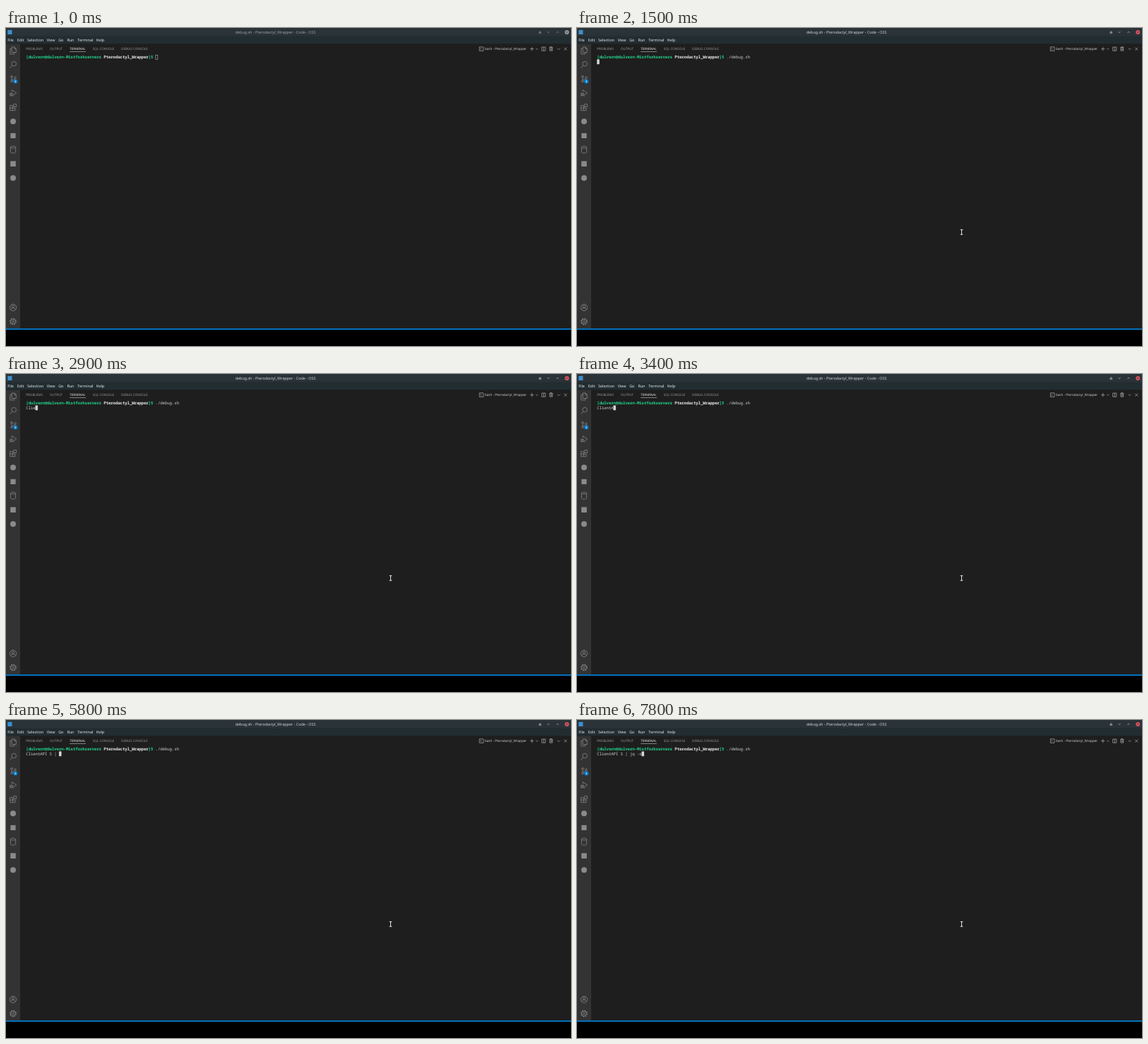
An HTML page for the animation above (8000 ms loop, 800 by 450 pixels).

```html
<!DOCTYPE html>
<html lang="en">
<head>
<meta charset="utf-8">
<title>Terminal session</title>
<style>
  html, body { margin: 0; width: 100%; height: 100%; overflow: hidden; background: #000; }
  svg { display: block; width: 100vw; height: 100vh; }
  text { white-space: pre; text-rendering: geometricPrecision; }
  .ui { font: 5.417px "Noto Sans", sans-serif; fill: #e6e8e8; }
  .tabs { font: 4.583px "Noto Sans", sans-serif; fill: #989898; }
  .mono { font: 5.833px "Noto Sans Mono", monospace; letter-spacing: -.1667px; fill: #cccccc; }
  .prompt { font-weight: 700; fill: #23d18b; }
  .icon { fill: none; stroke: #8a8a8a; stroke-width: .75; stroke-linejoin: round; }
  .tool { fill: none; stroke: #c5c5c5; stroke-width: .6; }
  .frame { fill: none; stroke: #a2a7aa; stroke-width: .6; }
  #title { fill: #9da2a5; }
  #close { fill: #969b9e; }
  .focused #title { fill: #d3d6d8; }
  .focused #close { fill: #e0525f; }
  .focused .frame { stroke: #d3d6d8; }
  #cursor { fill: none; stroke: #d4d4d4; stroke-width: .5; }
  .focused #cursor { fill: #d8d8d8; }
</style>
</head>
<body>
<svg id="stage" viewBox="0 0 800 450" preserveAspectRatio="none">
  <rect width="800" height="450"/>
  <rect width="800" height="12" fill="#2a3338"/>
  <rect y="11.5" width="800" height="11.3" fill="#222d31"/>
  <rect y="22.5" width="800" height="403" fill="#1e1e1e"/>
  <rect y="22.5" width="20" height="403" fill="#333333"/>
  <rect y="425.2" width="800" height="1.9" fill="#007acc"/>

  <!-- Window frame -->
  <rect x="2.3" y="2.8" width="6.2" height="6.2" fill="#3b8fd0"/>
  <g class="ui">
    <text id="title" x="381.6" y="7.9" text-anchor="middle">debug.sh - Pterodactyl_Wrapper - Code - OSS</text>
    <text x="2.2" y="18.8">File</text>
    <text x="15.8" y="18.8">Edit</text>
    <text x="30" y="18.8">Selection</text>
    <text x="57.7" y="18.8">View</text>
    <text x="74.2" y="18.8">Go</text>
    <text x="86.4" y="18.8">Run</text>
    <text x="101.3" y="18.8">Terminal</text>
    <text x="127.6" y="18.8">Help</text>
  </g>
  <g class="frame">
    <path d="M754.6 6.3L756.2 4.4L757.8 6.3ZM754.6 7.4h3.2"/>
    <path d="M766.4 5.2L768 6.7L769.6 5.2M779.4 6.7L781 5.2L782.6 6.7"/>
  </g>
  <circle id="close" cx="794.2" cy="5.9" r="3"/>
  <path d="M793 4.7l2.4 2.4m0-2.4l-2.4 2.4" stroke="#2a3338" stroke-width=".6"/>

  <!-- Panel header -->
  <g class="tabs">
    <text x="28.2" y="31.2">PROBLEMS</text>
    <text x="62" y="31.2">OUTPUT</text>
    <text x="90.2" y="31.2" fill="#e7e7e7" style="fill:#e7e7e7">TERMINAL</text>
    <text x="122.8" y="31.2">SQL CONSOLE</text>
    <text x="163.1" y="31.2">DEBUG CONSOLE</text>
    <text x="677.9" y="31.2" style="fill:#cccccc">bash - Pterodactyl_Wrapper</text>
  </g>
  <rect x="90.2" y="33.3" width="22.8" height=".5" fill="#e7e7e7"/>
  <g class="tool">
    <path d="M670.3 26.8h5.6v5.6h-5.6zM671.7 28.3l1.4 1.3l-1.4 1.3"/>
    <path d="M742 29.6h5.4M744.7 26.9v5.4"/>
    <path d="M750.4 29l1.4 1.4l1.4-1.4"/>
    <path d="M758.7 27h5.2v5.2h-5.2zM761.3 27v5.2"/>
    <path d="M769.2 27.6h5.2M770.8 27.5v-.9h2v.9M769.9 27.7v4.5h3.8v-4.5M771.2 28.7v2.5M772.4 28.7v2.5"/>
    <path d="M780.7 28.7l2 2l2-2M790.2 27.6l4 4m0-4l-4 4"/>
  </g>

  <!-- Activity bar -->
  <g class="icon">
    <path d="M8.2 27h3.9l2.2 2.2v5.3H8.2zM12 27v2.4h2.3M8.2 29.3H5.8v7.6h6v-2.4"/>
    <path d="M8.5 53.2L5.6 56.7"/><circle cx="11.2" cy="50.6" r="3.3"/>
    <circle cx="8" cy="69" r="1.4"/><circle cx="8" cy="75.3" r="1.4"/><circle cx="13" cy="70.4" r="1.4"/>
    <path d="M8 70.4v3.5M13 71.8c0 1.5-3.5 1.3-5 2"/>
    <path d="M8.3 90.5V87.6L14.7 92L10.5 95"/><circle cx="8" cy="94" r="1.9"/>
    <path d="M5 92l1.4 1M4.8 94.3h1.3M5 96.6l1.4-1M11 96.6l-1.4-1M8 92.2v3.6"/>
    <path d="M5.6 109.7h3.8v7H5.6zM5.6 113.2h7.4v3.5H9.4M10.7 107.7h3.8v3.8h-3.8z"/>
    <ellipse cx="10" cy="168.6" rx="3.6" ry="1.4"/>
    <path d="M6.4 168.6v7c0 1.9 7.2 1.9 7.2 0v-7"/>
    <circle cx="10" cy="395.5" r="4.7"/><circle cx="10" cy="394.2" r="1.8"/>
    <path d="M6.8 398.8c.5-3.7 5.9-3.7 6.4 0"/>
    <circle cx="10" cy="415.4" r="1.3"/><circle cx="10" cy="415.4" r="3.5"/>
    <circle cx="10" cy="415.4" r="4.2" stroke-width="1.3" stroke-dasharray="1.65 1.65"/>
  </g>
  <g fill="#8a8a8a">
    <circle cx="10" cy="132.3" r="4"/>
    <rect x="6.4" y="148.8" width="7.2" height="7.2"/>
    <rect x="6.2" y="188.4" width="7.6" height="7.6"/>
    <circle cx="10" cy="212.2" r="4"/>
  </g>
  <circle cx="13.3" cy="75.5" r="3.1" fill="#007acc"/>
  <text x="13.3" y="76.9" text-anchor="middle" style="font:600 3.75px 'Noto Sans',sans-serif" fill="#fff">2</text>

  <!-- Terminal -->
  <g class="mono">
    <g class="prompt">
      <text x="28.3" y="43.2">[dulvern@dulvern-Mistforkservers</text>
      <text x="138.3" y="43.2" style="fill:#e5e5e5">Pterodactyl_Wrapper</text>
      <text x="201.6" y="43.2">]$</text>
    </g>
    <text id="command" x="211.6" y="43.2"></text>
    <text id="input" x="28.3" y="49.9"></text>
  </g>
  <rect id="cursor" width="3" height="6.2"/>
  <g id="pointer" fill="none">
    <path d="M-1.8-3.4h3.6M0-3.4v6.8M-1.8 3.4h3.6" stroke="#111" stroke-width="1.9"/>
    <path d="M-1.8-3.4h3.6M0-3.4v6.8M-1.8 3.4h3.6" stroke="#f2f2f2" stroke-width="1"/>
  </g>
</svg>
<script>
  const LOOP = 8000, COL = 10 / 3, LEFT = 28.3, PROMPT_COLS = 55;
  const FOCUS = 500, RECALL = 1100, ENTER = 1400;
  const COMMAND = "./debug.sh", INPUT = "ClientAPI S | jq -r";
  const keyTimes = [2300, 2400, 2600, 2800, 3000, 3100, 3400, 3500, 3600, 3900,
    4200, 5400, 5600, 5800, 6400, 6600, 7100, 7300, 7700];
  // time, x, y
  const pointerSteps = [[100, 104, 43], [200, 400, 200], [300, 553, 288.8], [500, 544.6, 288.8]];

  const el = id => document.getElementById(id);
  const stage = el("stage"), command = el("command"), input = el("input");
  const cursor = el("cursor"), pointer = el("pointer");

  function render(t) {
    const typed = keyTimes.filter(k => k <= t).length;
    const recalled = t >= RECALL, entered = t >= ENTER;
    stage.classList.toggle("focused", t >= FOCUS);
    command.textContent = recalled ? COMMAND : "";
    input.textContent = INPUT.slice(0, typed);

    const col = entered ? typed : PROMPT_COLS + (recalled ? COMMAND.length : 0);
    cursor.setAttribute("x", LEFT + col * COL + .2);
    cursor.setAttribute("y", entered ? 44.8 : 38.2);

    const step = pointerSteps.filter(s => s[0] <= t).pop();
    pointer.setAttribute("visibility", step ? "visible" : "hidden");
    if (step) pointer.setAttribute("transform", `translate(${step[1]} ${step[2]})`);
  }

  const start = performance.now();
  function tick() {
    render((performance.now() - start) % LOOP);
    requestAnimationFrame(tick);
  }
  tick();
</script>
</body>
</html>
```
